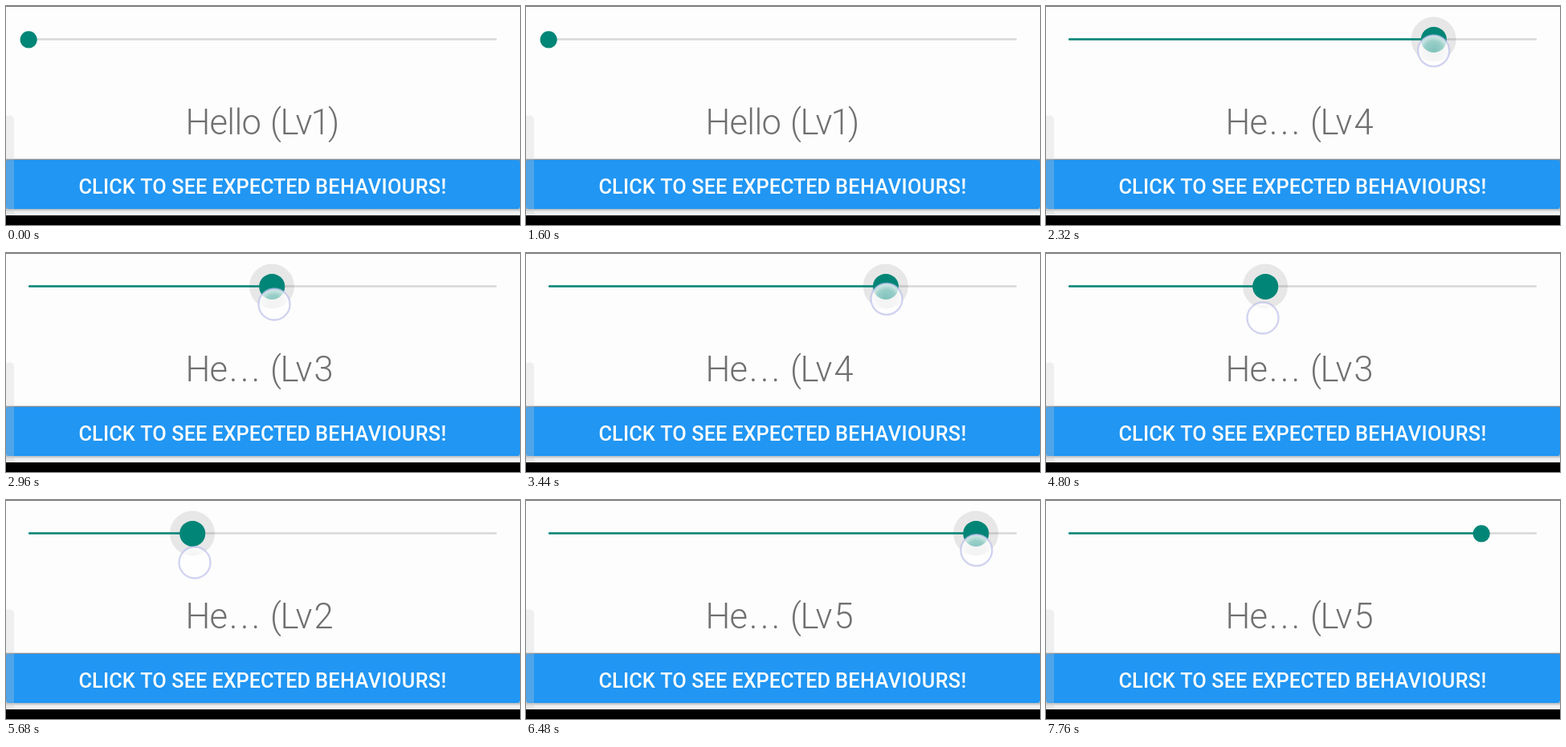
Recreate the animation shown at these times as an HTML page with a canvas. Size 640 by 273 pixels, loop 7.84 s.

```html
<!DOCTYPE html>
<html lang="en">
<head>
<meta charset="utf-8">
<title>Slider label</title>
<style>
  html, body { margin: 0; width: 100%; height: 100%; overflow: hidden; background: #fdfdfd; }
  canvas { display: block; width: 640px; height: 273px; }
</style>
</head>
<body>
<canvas id="stage" width="640" height="273"></canvas>
<script>
const ctx = document.getElementById('stage').getContext('2d');
const LOOP = 7840, STEP = 80;
const LEFT = 28, RIGHT = 611, TRACK_Y = 41.5;
const DOWN = 1720, UP = 7120, GROW = 120;
const GREEN = '#008577';
const FONT = 'Roboto, "Open Sans", sans-serif';

// time, thumb x, finger x offset, finger y
const path = [
  [1720, 28, 0, 46], [2440, 519, 0, 58], [2800, 300, 0, 63],
  [2960, 331, 3, 64], [4000, 582, -1, 49], [4080, 596, -1, 50],
  [4800, 273, -3, 81], [5240, 140, 0, 82], [5680, 232, 3, 78],
  [6400, 555, 1, 64], [6800, 570, 0, 58], [7120, 542, 0, 56]
];

const clamp = (v, a, b) => Math.min(b, Math.max(a, v));

// Slope at a key; flat where the motion turns round
function slope(i, k) {
  if (i === 0 || i === path.length - 1) return 0;
  const [a, b, c] = [path[i - 1], path[i], path[i + 1]];
  const before = (b[k] - a[k]) / (b[0] - a[0]);
  const after = (c[k] - b[k]) / (c[0] - b[0]);
  return before * after > 0 ? 2 * before * after / (before + after) : 0;
}

function along(t, k) {
  const last = path.length - 1;
  if (t <= path[0][0]) return path[0][k];
  if (t >= path[last][0]) return path[last][k];
  const i = path.findIndex(p => p[0] > t) - 1;
  const a = path[i], b = path[i + 1], d = b[0] - a[0];
  const u = (t - a[0]) / d, v = 1 - u;
  return v * v * (1 + 2 * u) * a[k] + u * u * (3 - 2 * u) * b[k]
    + d * u * v * (v * slope(i, k) - u * slope(i + 1, k));
}

function disc(x, y, r, fill) {
  ctx.beginPath();
  ctx.arc(x, y, r, 0, Math.PI * 2);
  ctx.fillStyle = fill;
  ctx.fill();
}

function rect(x, y, w, h, fill, radii = 0) {
  ctx.beginPath();
  ctx.roundRect(x, y, w, h, radii);
  ctx.fillStyle = fill;
  ctx.fill();
}

function text(str, x, y, spacing = 0) {
  ctx.letterSpacing = spacing + 'px';
  ctx.fillText(str, x, y);
}

function track(from, to, fill) {
  rect(from, TRACK_Y - 1.25, to - from, 2.5, fill, 1);
}

function drawFinger(x, y) {
  const glow = ctx.createRadialGradient(x, y, 0, x, y, 19.5);
  glow.addColorStop(0, 'rgba(255,255,255,0.5)');
  glow.addColorStop(0.6, 'rgba(255,255,255,0.6)');
  glow.addColorStop(1, 'rgba(255,255,255,0.85)');
  disc(x, y, 19.5, glow);
  ctx.strokeStyle = 'rgba(184,188,234,0.65)';
  ctx.lineWidth = 2.3;
  ctx.stroke();
}

function drawSlider(t) {
  const x = clamp(along(t, 1), LEFT, RIGHT);
  const press = clamp((t - DOWN) / GROW, 0, 1) * clamp(1 - (t - UP) / GROW, 0, 1);
  track(LEFT, RIGHT, '#d8d8d8');
  if (press > 0) disc(x, TRACK_Y, 10 + 18 * press, `rgba(60,60,60,${0.11 * press})`);
  if (x > LEFT) track(LEFT, x, GREEN);
  disc(x + 0.2, TRACK_Y + 0.4, 10.6 + 5.4 * press, GREEN);
  if (t >= DOWN && t < UP) drawFinger(x + along(t, 2), along(t, 3));
  return x;
}

function drawLabel(x) {
  const level = Math.min(5, 1 + Math.floor(5 * (x - LEFT) / (RIGHT - LEFT)));
  ctx.font = '350 43.5px ' + FONT;
  ctx.fillStyle = '#707070';
  if (level === 1) {
    text('Hello', 223.5, 160, -0.7);
    text('(Lv', 329, 160, -1.3);
    text('1', 379.5, 160);
    text(')', 401, 160);
  } else {
    text('He', 223.5, 160, -0.7);
    text('...', 278, 160, 3.5);
    text('(Lv', 329, 160, -1.3);
    text(String(level), 383.5, 160);
  }
}

function drawButton() {
  rect(0, 190, 640, 1, '#d4d6d8');
  rect(0, 191, 640, 3, '#7f8b96');
  const shade = ctx.createLinearGradient(0, 253, 0, 261);
  shade.addColorStop(0, '#b4b9bd');
  shade.addColorStop(0.45, '#eeeeee');
  shade.addColorStop(1, '#fafafa');
  rect(0, 252, 640, 9, shade);
  rect(0, 192, 640, 61, '#2196f3', 3);
  ctx.font = '500 25.3px ' + FONT;
  ctx.fillStyle = '#fff';
  text('CLICK TO SEE', 90.5, 233.5, 0.1);
  text('EXPECTED', 256.5, 233.5, -0.1);
  text('BEHAVIOURS!', 385, 233.5, 0.35);
}

function draw(now) {
  const t = Math.floor(now % LOOP / STEP) * STEP;
  rect(0, 0, 640, 273, '#fdfdfd');
  drawLabel(drawSlider(t));
  drawButton();
  rect(0, 136.5, 10, 124.5, 'rgba(200,200,200,0.28)', [0, 5, 0, 0]);
  rect(0, 0, 640, 1, '#707070');
  rect(0, 261, 640, 12, '#000');
}

const start = performance.now();
function tick() {
  draw(performance.now() - start);
  requestAnimationFrame(tick);
}
tick();
</script>
</body>
</html>
```
